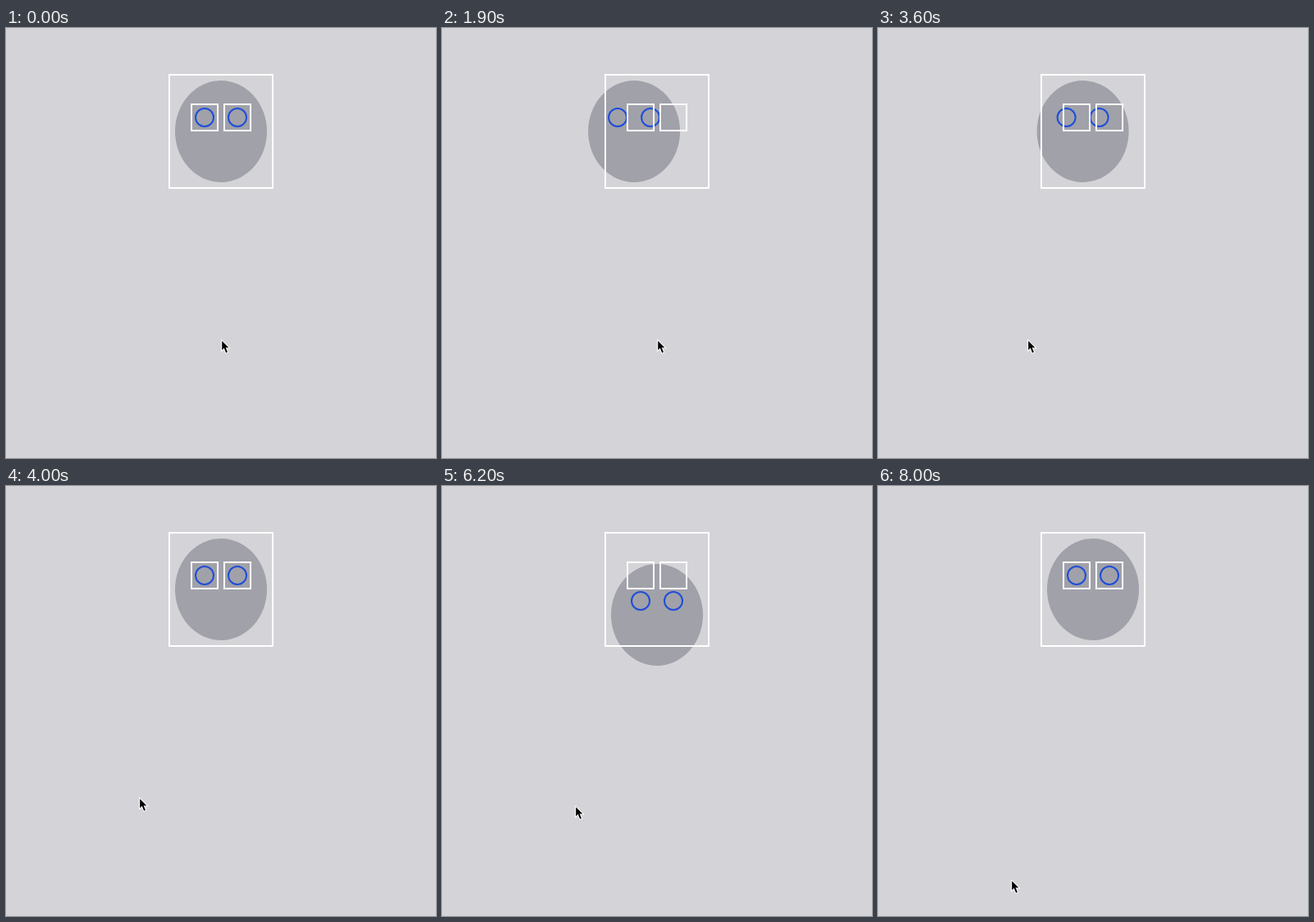
Recreate the animation shown at these times as an HTML page. Size 524 by 524 pixels, loop 9.02 s.

```html
<!DOCTYPE html>
<html lang="en">
<head>
<meta charset="utf-8">
<title>Face tracking</title>
<style>
  html, body { margin: 0; width: 100%; height: 100%; overflow: hidden; background: #d4d4d8; }
  div, svg { position: absolute; box-sizing: border-box; }
  #face { left: 206px; top: 64px; width: 112px; height: 124px; border-radius: 50%; background: #a1a1aa; }
  .eye { top: 33px; width: 24px; height: 24px; border: 2px solid #1d4ed8; border-radius: 50%; }
  .bound { border: 2px solid #fff; }
  .head { left: 198px; top: 56px; width: 128px; height: 140px; }
  .socket { top: 92px; width: 34px; height: 34px; }
  #cursor { left: 254px; top: 374px; }
</style>
</head>
<body>
<div id="face">
  <div class="eye" style="left: 24px"></div>
  <div class="eye" style="left: 64px"></div>
</div>
<div class="bound head"></div>
<div class="bound socket" style="left: 225px"></div>
<div class="bound socket" style="left: 265px"></div>
<svg id="cursor" width="28" height="28">
  <path fill="#fff" d="M8.2 20.9V4.9L19.8 16.5H13L12.6 16.6ZM17.3 21.6L13.7 23.1L9 12L12.7 10.5Z"/>
  <rect x="12.5" y="13.6" width="2" height="8" transform="matrix(.9221 -.3871 .3871 .9221 -5.7605 6.5909)"/>
  <path d="M9.2 7.3V18.5L12.2 15.6L12.6 15.5H17.4Z"/>
</svg>
<script>
  const LOOP = 9020, TICK = 20;
  const HALF = 4000;  // the sideways half, then the same motion vertically
  const FACE_SHIFT = 31, CURSOR_SHIFT = 100;

  const face = document.getElementById("face");
  const cursor = document.getElementById("cursor");

  const ramp = (time, start, duration) =>
    Math.min(1, Math.max(0, (time - start) / duration));

  // The face slides out, waits a second and slides back.
  const faceShift = time => FACE_SHIFT * (ramp(time, 1000, 1000) - ramp(time, 3000, 1000));
  const cursorShift = time => CURSOR_SHIFT * ramp(time, 2000, 2000);

  function move(element, shift, time) {
    element.style.transform = `translate(${-shift(time)}px, ${shift(time - HALF)}px)`;
  }

  function draw() {
    const time = Math.floor((performance.now() % LOOP) / TICK) * TICK;
    move(face, faceShift, time);
    move(cursor, cursorShift, time);
    requestAnimationFrame(draw);
  }
  draw();
</script>
</body>
</html>
```
